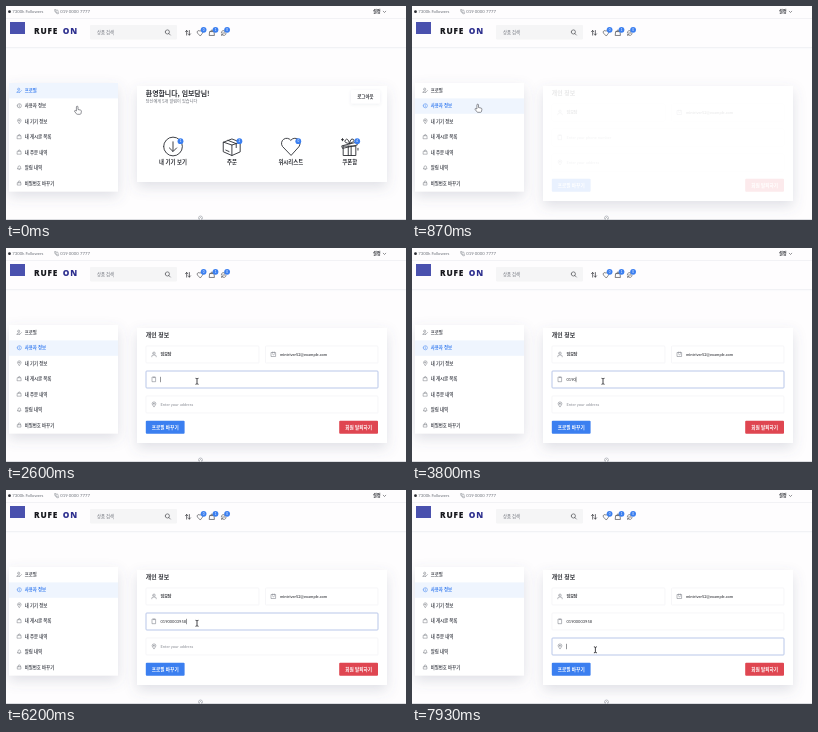
Recreate the animation shown at these times as an HTML page. Size 400 by 214 pixels, loop 8 s.

```html
<!DOCTYPE html>
<html lang="ko">
<head>
<meta charset="utf-8">
<title>Account page</title>
<style>
html, body { margin: 0; width: 100%; height: 100%; overflow: hidden; background: #fefdfe; }
svg { display: block; width: 100%; height: 100%; }
text { font-family: Lato, "Noto Sans CJK KR", "Noto Sans CJK", sans-serif; }
.ko { font-family: "Noto Sans CJK KR", "Noto Sans CJK", sans-serif; }
.bold { font-weight: 700; }
.logo { font-family: "Open Sans", sans-serif; font-weight: 800; letter-spacing: .8px; }
.icon { fill: none; stroke-width: .5; stroke-linecap: round; stroke-linejoin: round; }
</style>
</head>
<body>
<svg id="stage" viewBox="0 0 400 214">
  <defs>
    <filter id="shadow" x="-20%" y="-20%" width="140%" height="150%">
      <feDropShadow dx="0" dy="5" stdDeviation="6.5" flood-color="#56607c" flood-opacity=".19"/>
    </filter>
    <filter id="soft" x="-30%" y="-40%" width="160%" height="200%">
      <feDropShadow dx="0" dy="1" stdDeviation="1.5" flood-color="#56607c" flood-opacity=".1"/>
    </filter>
  </defs>
</svg>
<script>
const LOOP = 8000, SELECT = 560, SWAP = 790;
const KEY_START = 2800, KEY_GAP = 300, FOCUS_PHONE = 2150, FOCUS_ADDRESS = 7450;
const PHONE = '01900003958';
const BLUE = '#3b7ff0', INK = '#2b2d33', SOFT = '#4e5159', LINE = '#6d717a', GREY = '#8b8e96';
const stage = document.getElementById('stage');

function el(tag, attrs = {}, parent = stage) {
  const node = document.createElementNS('http://www.w3.org/2000/svg', tag);
  for (const k in attrs) node.setAttribute(k, attrs[k]);
  return parent.appendChild(node);
}
function text(str, x, y, size, opts = {}, parent = stage) {
  const node = el('text', { x, y, 'font-size': size, fill: INK, ...opts }, parent);
  node.textContent = str;
  return node;
}
const ko = (str, x, y, size, opts, parent) => text(str, x, y, size, { class: 'ko', ...opts }, parent);
const bold = (str, x, y, size, opts, parent) => text(str, x, y, size, { class: 'ko bold', ...opts }, parent);
const rect = (x, y, width, height, fill, opts, parent) =>
  el('rect', { x, y, width, height, fill, ...opts }, parent);
const group = (parent, attrs) => el('g', attrs, parent);

const ICONS = {
  user: 'M-1.2-1.2a1.2 1.2 0 1 0 2.4 0a1.2 1.2 0 1 0-2.4 0M-2.2 2.4V1.9Q-2.2.7-1 .7H1Q2.2.7 2.2 1.9V2.4',
  edit: 'M-1.7-1.2a1.1 1.1 0 1 0 2.2 0a1.1 1.1 0 1 0-2.2 0M-2.4 2.2Q-2.4.7-.6.7H.2M.4 2.2L2.4.2M-2.4 2.2H.4',
  info: 'M-2.2 0a2.2 2.2 0 1 0 4.4 0a2.2 2.2 0 1 0-4.4 0M0-.1V1.1M0-1.1V-1',
  pin: 'M0 2.4Q-1.9.4-1.9-.6a1.9 1.9 0 0 1 3.8 0Q1.9.4 0 2.4M-.6-.6a.6.6 0 1 0 1.2 0a.6.6 0 1 0-1.2 0',
  bag: 'M-1.7-1H1.7L2 2.2H-2ZM-.9-1V-1.4a.9.9 0 0 1 1.8 0V-1',
  bell: 'M-1.9 1.3H1.9Q1.3.8 1.3-.5a1.3 1.3 0 0 0-2.6 0Q-1.3.8-1.9 1.3M-.4 2.1H.4',
  lock: 'M-1.7-.3H1.7V2.2H-1.7ZM-1.1-.3V-1.1a1.1 1.1 0 0 1 2.2 0V-.3',
  phone: 'M-1.6-2.3H1.6V2.3H-1.6ZM-.5-2.3V-1.8H.5V-2.3',
  mail: 'M-2.1-1.9H2.1V2.1H-2.1ZM-1.2-.6L0 .3L1.2-.6M-.8-1.9V-2.4M.8-1.9V-2.4',
  heart: 'M0 2.4L-2.3 0a1.4 1.4 0 0 1 2.3-1.7a1.4 1.4 0 0 1 2.3 1.7Z',
  sync: 'M-2.3-.2a2.2 2.2 0 0 1 4-1.2M2.3.2a2.2 2.2 0 0 1-4 1.2M2-2.4V-1.2H.8M-2 2.4V1.2H-.8M-1 0H1',
  sort: 'M-1.3 2.2V-2.2M-2.4-1L-1.3-2.2L-.2-1M1.3-2.2V2.2M.2 1L1.3 2.2L2.4 1',
  search: 'M-2.2-.4a1.9 1.9 0 1 0 3.8 0a1.9 1.9 0 1 0-3.8 0M1 1L2.4 2.4',
  call: 'M-1.8-2L-.8-2.2L-.2-.9L-.8-.4Q-.3.6.6 1L1.1.4L2.2 1L2 2Q1 2.6-.6 1.2T-1.8-2M.5-2Q1.8-1.8 2-.5',
  download: 'M-2.6 0a2.6 2.6 0 1 0 5.2 0a2.6 2.6 0 1 0-5.2 0M0-1.3V1.3M-1 .4L0 1.4L1 .4',
  parcel: 'M-2.3-1.2L0-.4L2.3-1.2V1.5L0 2.5L-2.3 1.5ZM0-.4V2.5M-2.3-1.2L0-2.1L2.3-1.2M-1.1-1.7L1.2-.8V.3M-1.7 1L-.8 1.4',
  gift: 'M-1.7-.1H1.7V2.5H-1.7ZM-.4-.1V2.5M.4-.1V2.5M-2.1-.2L1.9-1.2L2.1-.4L-1.9.5ZM0-.8Q-1.8-1-1.2-1.8T0-.8Q.2-2.4 1-2T0-.8M-2-2.2V-1.6M-2.3-1.9H-1.7M2.3.5V1'
};
function icon(name, x, y, scale = 1, stroke = LINE, parent = stage, weight = .5) {
  return el('path', {
    d: ICONS[name], class: 'icon', stroke,
    transform: `translate(${x} ${y}) scale(${scale})`, style: `stroke-width:${weight}`
  }, parent);
}
function badge(n, x, y, parent) {
  el('circle', { cx: x, cy: y, r: 2.9, fill: BLUE }, parent);
  text(n, x, y + 1.1, 3, { fill: '#fff', 'text-anchor': 'middle' }, parent);
}

// Header
el('circle', { cx: 3.5, cy: 5.7, r: 1.4, fill: INK });
text('7300k Followers', 6.3, 7.2, 4.25, { fill: LINE });
icon('call', 50.5, 5.7, .95);
text('019 0000 7777', 54.3, 7.2, 4.3, { fill: LINE });
bold('설정', 367, 7.3, 4.2);
el('path', { d: 'M377.2 5.2l1.3 1.3l1.3-1.3', class: 'icon', stroke: INK });
rect(0, 12, 400, .6, '#ececf0');
rect(4, 16, 15, 12, '#4a51ae');
text('RUFE', 28, 28, 8.3, { class: 'logo', fill: '#17181d' });
text('ON', 56.8, 28, 8.3, { class: 'logo', fill: '#2d2f8e' });
rect(84, 19, 87, 14.5, '#f5f5f6', { rx: 1 });
ko('상품 검색', 91, 27.8, 4.3, { fill: LINE });
icon('search', 161.7, 26.4, 1.1, INK);
icon('sort', 182, 26.8, 1.05, INK, stage, .65);
icon('heart', 194, 27.1, 1.1, INK);
badge('0', 197.6, 23.8);
icon('bag', 206, 26.8, 1.2, INK);
badge('1', 209.5, 23.8);
icon('sync', 217.7, 27, 1.05, INK);
badge('0', 221.1, 23.8);
rect(0, 41, 400, .7, '#e6e7ee');
rect(0, 41.7, 400, 1.5, '#fafafc');

// Sidebar
rect(3, 77, 109, 108.5, '#fff', { filter: 'url(#shadow)' });
const band = rect(3, 77, 109, 15.4, '#eff5fe');
const menu = [
  ['edit', '프로필'], ['info', '사용자 정보'], ['pin', '내 기기 정보'], ['bag', '내 게시글 목록'],
  ['bag', '내 주문 내역'], ['bell', '알림 내역'], ['lock', '비밀번호 바꾸기']
].map(([name, label], i) => {
  const y = 84.3 + i * 15.45;
  return { icon: icon(name, 13.3, y, .95), label: bold(label, 18.7, y + 1.6, 4.4) };
});

// Profile panel
const card = rect(131, 80, 250, 96, '#fff', { filter: 'url(#shadow)' });
const welcome = group(stage);
bold('환영합니다, 임보담님!', 139.8, 90.2, 6.9, {}, welcome);
ko('당신에게 5개 알림이 있습니다', 139.8, 97.3, 4.15, { fill: '#666a73' }, welcome);
rect(345, 84, 29, 13.5, '#fff', { rx: 1.5, filter: 'url(#soft)' }, welcome);
bold('로그아웃', 359.4, 92.4, 4.4, { 'text-anchor': 'middle' }, welcome);
[['download', '내 기기 보기', '1'], ['parcel', '주문', '2'], ['heart', '위시리스트', '0'], ['gift', '쿠폰함', '4']]
  .forEach(([name, label, n], i) => {
    const x = 167 + i * 58.9;
    icon(name, x, 140.5, 3.6, INK, welcome, .25);
    badge(n, x + 7.5, 135.2, welcome);
    bold(label, x, 158.2, 5.4, { 'text-anchor': 'middle' }, welcome);
  });

// Form panel
const form = group(stage);
bold('개인 정보', 139.8, 89.2, 5.9, {}, form);
function field(x, y, width, name, value, opts) {
  const box = rect(x, y, width, 17, '#fff', { rx: .8, stroke: '#f2f2f5', 'stroke-width': .7 }, form);
  icon(name, x + 8, y + 8.4, 1, LINE, form);
  return { box, y, value: text(value, x + 14.5, y + 9.9, 4, opts, form) };
}
field(140, 98, 113, 'user', '임보담', { class: 'ko bold' });
field(259.5, 98, 112.5, 'mail', 'mintriver52@example.com', { 'font-weight': 500 });
const phone = field(140, 123, 232, 'phone', '');
const address = field(140, 148, 232, 'pin', '');
function button(x, label, fill) {
  rect(x, 172.8, 38.8, 13, fill, { rx: 1 }, form);
  bold(label, x + 19.4, 181, 4.65, { fill: '#fff', 'text-anchor': 'middle' }, form);
}
button(139.8, '프로필 바꾸기', BLUE);
button(333.2, '회원 탈퇴하기', '#df4651');
const caret = rect(0, 0, .5, 5.4, INK, {}, form);

// Footer edge
rect(0, 213, 400, 1, '#dcdde1');
el('circle', { cx: 194.5, cy: 212, r: 2, fill: '#fff', stroke: '#9699a1', 'stroke-width': .6 });
el('path', { d: 'M193.6 212.4l.9-.9l.9.9', class: 'icon', stroke: LINE });

// Pointer shapes
const pointer = group(stage);
const outline = { fill: '#fff', stroke: '#3a3c44', 'stroke-width': .55, 'stroke-linejoin': 'round' };
const shapes = {
  hand: el('path', { d: 'M-.8.8a.8.8 0 0 1 1.6 0V3.3l2.6.6q.9.3.8 1.2l-.4 2.2q-.2.8-1 .8H.2q-.6 0-1-.5L-2.6 5.2q-.3-.8.6-.9l1.2.5Z', ...outline }, pointer),
  arrow: el('path', { d: 'M0 0V6.4L1.6 5L2.6 7.3L3.6 6.9L2.6 4.7H4.6Z', ...outline }, pointer),
  beam: el('path', { d: 'M-1.5-3Q0-3 0-2.2Q0-3 1.5-3M0-2.2V2.2M-1.5 3Q0 3 0 2.2Q0 3 1.5 3', fill: 'none', stroke: '#17181d', 'stroke-width': .8 }, pointer)
};

const clamp = v => Math.max(0, Math.min(1, v));
const ramp = (t, a, b) => clamp((t - a) / (b - a));
const ease = v => v * v * (3 - 2 * v);
const show = (node, on) => node.setAttribute('visibility', on ? 'visible' : 'hidden');

// Start, end, x, y of each pointer move
const moves = [[80, 480, 65.7, 98.2], [1450, 2000, 191, 133.3], [7000, 7380, 183.4, 159.8]];
function pointerAt(t) {
  let x = 71.2, y = 100.2;
  for (const [a, b, tx, ty] of moves) {
    const k = ease(ramp(t, a, b));
    x += (tx - x) * k;
    y += (ty - y) * k;
  }
  return [x, y];
}

function focus(f, on) {
  f.box.setAttribute('stroke', on ? '#9cb0e0' : '#f2f2f5');
}

function render(t) {
  const active = t < SELECT ? 0 : 1;
  band.setAttribute('y', 77 + active * 15.4);
  menu.forEach((item, i) => {
    item.label.setAttribute('fill', i === active ? BLUE : SOFT);
    item.icon.setAttribute('stroke', i === active ? BLUE : LINE);
  });

  card.setAttribute('height', t < SWAP ? 96 : 115);
  welcome.setAttribute('opacity', 1 - ramp(t, 600, 760));
  form.setAttribute('opacity', ramp(t, 848, 1060));

  const onPhone = t >= FOCUS_PHONE && t < FOCUS_ADDRESS;
  const onAddress = t >= FOCUS_ADDRESS;
  const typed = Math.max(0, Math.min(PHONE.length, Math.floor((t - KEY_START) / KEY_GAP) + 1));
  focus(phone, onPhone);
  focus(address, onAddress);
  phone.value.textContent = typed ? PHONE.slice(0, typed) : onPhone ? '' : 'Enter your phone number';
  phone.value.setAttribute('fill', typed ? INK : GREY);
  address.value.textContent = onAddress ? '' : 'Enter your address';
  address.value.setAttribute('fill', GREY);

  const lastKey = typed ? KEY_START + (typed - 1) * KEY_GAP : FOCUS_PHONE;
  const since = t - (onAddress ? FOCUS_ADDRESS : lastKey);
  show(caret, (onPhone || onAddress) && since % 1060 < 530);
  caret.setAttribute('x', 154.5 + (onPhone && typed ? phone.value.getComputedTextLength() : 0));
  caret.setAttribute('y', (onAddress ? address.y : phone.y) + 5.8);

  const [x, y] = pointerAt(t);
  const inField = x > 140 && (Math.abs(y - 131.5) < 8.5 || Math.abs(y - 156.5) < 8.5);
  const kind = x < 112 ? 'hand' : inField ? 'beam' : 'arrow';
  for (const k in shapes) show(shapes[k], k === kind);
  pointer.setAttribute('transform', `translate(${x} ${y})`);
}

const start = performance.now();
function tick() {
  render((performance.now() - start) % LOOP);
  requestAnimationFrame(tick);
}
tick();
</script>
</body>
</html>
```
